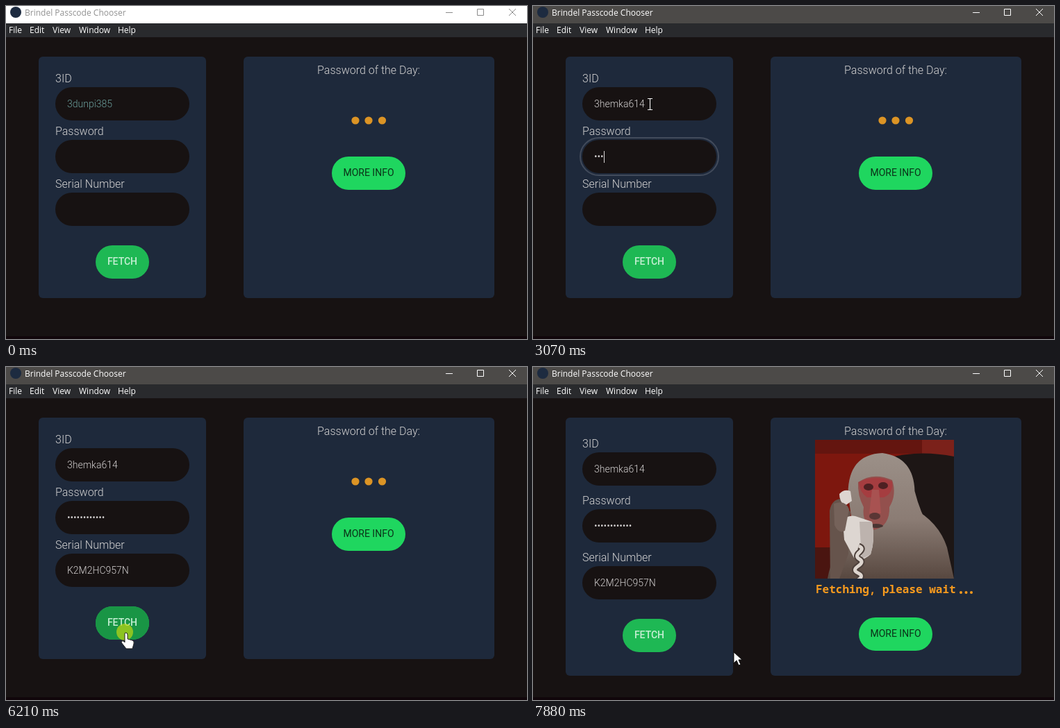
An HTML page with a canvas that plays this animation: 750x480 px, repeating every 8 s.

```html
<!DOCTYPE html>
<html lang="en">
<head>
<meta charset="utf-8">
<title>Password fetch</title>
<style>
  html, body { margin: 0; width: 100%; height: 100%; overflow: hidden; background: #171212; }
  canvas { display: block; }
</style>
</head>
<body>
<canvas id="stage" width="750" height="480"></canvas>
<script>
const ctx = document.getElementById('stage').getContext('2d');
const LOOP = 8000, FOCUS = 600, LOADING = 6350;
const UI = '12px "Open Sans", sans-serif';
const LABEL = '300 16px Roboto, sans-serif';
const INPUT = '300 14px Roboto, sans-serif';
const GREEN = '#1eb854', HOVER_GREEN = '#199545', PANEL = '#1e293b', DARK = '#171212';

const idKeys = [1000, 1210, 1410, 1500, 1580, 1670, 1810, 1900, 2000];
const passwordKeys = [2670, 2870, 3070, 3200, 3340, 3400, 3610, 3880, 3950, 4020, 4340, 4540];
// time, x, y
const mousePath = [
  [130, 215, 490], [560, 168, 141], [4740, 168, 141], [5140, 212, 352],
  [5500, 212, 352], [5950, 172, 384], [6280, 172, 384], [6500, 289, 411]
];

const ramp = (t, a, b) => {
  const k = Math.min(1, Math.max(0, (t - a) / (b - a)));
  return k * k * (3 - 2 * k);
};
const typed = (text, keys, t) => text.slice(0, keys.filter(k => k <= t).length);

function mouseAt(t) {
  let [, x, y] = mousePath[0];
  for (let i = 1; i < mousePath.length; i++) {
    const [a, x0, y0] = mousePath[i - 1], [b, x1, y1] = mousePath[i];
    const k = ramp(t, a, b);
    x += (x1 - x0) * k;
    y += (y1 - y0) * k;
  }
  return [x, y];
}

function rect(x, y, w, h, color, r = 0) {
  ctx.fillStyle = color;
  ctx.beginPath();
  ctx.roundRect(x, y, w, h, r);
  ctx.fill();
}
function disc(x, y, r, color, ry = r) {
  ctx.fillStyle = color;
  ctx.beginPath();
  ctx.ellipse(x, y, r, ry, 0, 0, 7);
  ctx.fill();
}
function text(str, x, y, font, color, align = 'left') {
  ctx.font = font;
  ctx.fillStyle = color;
  ctx.textAlign = align;
  ctx.fillText(str, x, y);
}
function shape(d, color, outline, width = 1) {
  const path = new Path2D(d);
  if (color) { ctx.fillStyle = color; ctx.fill(path); }
  if (outline) { ctx.strokeStyle = outline; ctx.lineWidth = width; ctx.stroke(path); }
}

function drawWindow(active) {
  rect(0, 0, 750, 480, DARK);
  rect(0, 476, 750, 4, '#10060a');
  rect(0, 0, 750, 25, active ? '#4c4a48' : '#fff');
  rect(0, 25, 750, 20, '#292a2d');
  disc(14, 9, 8, '#1d2b40');
  text('Brindel Passcode Chooser', 27, 14, UI, active ? '#fff' : '#919191');
  shape('M633 9.5h10M678.5 4.5h9v9h-9zM724 4l10 10M734 4l-10 10', null, active ? '#fff' : '#8a8a8a');
  [['File', 4], ['Edit', 34], ['View', 67], ['Window', 105], ['Help', 161]]
    .forEach(([name, x]) => text(name, x, 39, UI, '#fff'));
}

function drawField(label, value, y, { focused, caret, placeholder }) {
  text(label, 71, y - 7, LABEL, '#d3d2d2');
  rect(71, y, 193, 48, DARK, 24);
  if (focused) {
    ctx.strokeStyle = '#424b5b';
    ctx.lineWidth = 2;
    ctx.beginPath();
    ctx.roundRect(68, y - 3, 199, 54, 27);
    ctx.stroke();
  }
  text(value || placeholder || '', 88, y + 29, INPUT, value ? '#d3d0d0' : '#6a9e9b');
  if (focused && caret) rect(Math.round(88 + ctx.measureText(value).width), y + 16, 1, 17, '#d8d5d5');
}

function drawForm(t, loading) {
  const gap = loading ? 6 : 0;
  const focus = t < FOCUS ? -1 : t < 2140 ? 0 : t < 4740 ? 1 : t < 6140 ? 2 : -1;
  const caret = t < 5280 || t >= 5470;
  const fields = [
    ['3ID', typed('3hemka614', idKeys, t), '3dunpi385'],
    ['Password', typed('•'.repeat(12), passwordKeys, t)],
    ['Serial Number', t < 5470 ? '' : 'K2M2HC957N']
  ];
  rect(47, 73, 241, 348 + gap * 4, PANEL, 6);
  fields.forEach(([label, value, placeholder], i) =>
    drawField(label, value, 117 + 76 * i + gap * (i + 1), { focused: focus === i, caret, placeholder }));

  const y = 345 + gap * 3;
  rect(129, y, 77, 48, GREEN, 24);
  ctx.globalAlpha = ramp(t, 5700, 5900) - ramp(t, 6420, 6750);
  rect(129, y, 77, 48, HOVER_GREEN, 24);
  ctx.globalAlpha = 1;
  text('FETCH', 167.5, y + 28, '500 14px Roboto, sans-serif', '#c5efd3', 'center');
}

function drawMonkey(t) {
  const nod = 3.5 - 3.5 * Math.cos(Math.PI * (t - 6400) / 1500);
  const talk = Math.sin(t / 85);
  ctx.save();
  ctx.beginPath();
  ctx.rect(406, 105, 200, 200);
  ctx.clip();
  ctx.translate(406, 105);

  rect(0, 0, 200, 200, '#7d170e');
  rect(0, 0, 200, 20, '#64150f');
  rect(154, 0, 46, 32, '#7b211a');
  shape('M105 26Q150 14 200 24V200H105Z', '#1d1615');
  rect(0, 155, 40, 45, '#4a1510');

  const fur = ctx.createLinearGradient(0, 10, 0, 200);
  fur.addColorStop(0, '#9d928a');
  fur.addColorStop(0.55, '#8b7c74');
  fur.addColorStop(1, '#584840');
  shape('M18 200Q24 165 48 140L140 98Q178 118 190 155L200 200Z', fur);
  shape(`M${44 + nod / 2} ${70 + nod}Q48 ${14 + nod} 97 ${12 + nod}Q142 ${18 + nod} ${147 - nod / 2} 74
    Q151 104 166 130Q132 154 99 151Q70 154 54 125Z`, fur);

  ctx.save();
  ctx.translate(0, nod);
  shape('M62 54Q84 39 111 51Q118 72 107 90Q108 117 85 123Q67 113 70 90Q61 73 62 54Z', '#93504d');
  shape('M63 54Q86 42 111 53Q113 70 99 76H75Q64 68 63 54Z', '#a53d40');
  disc(77, 61, 7, '#4e2022', 5);
  disc(98, 59, 7, '#4e2022', 5);
  shape('M82 65H92L95 99H78Z', '#a85251');
  disc(86, 103, 8, '#5b3635', 5);
  disc(88, 117, 10, '#4a3533', 4 + talk);
  ctx.restore();

  ctx.translate(0, talk);
  shape('M22 210L21 103Q24 87 37 86L51 105L48 165L32 210Z', '#66544c');
  shape('M35 79Q42 71 51 75L53 89L43 96Q35 90 35 79Z', '#ddd5d0');
  shape('M40 117Q48 109 58 111L82 119Q87 145 80 166Q67 178 56 171L42 145Z', '#ddd6d1');
  shape('M64 119L82 119Q87 145 80 166L67 173Z', '#bdb3ae');
  shape('M27 93Q44 87 49 101L43 132Q34 137 28 124Z', '#75625a');
  shape('M63 154q8 3 1 9t0 10t-2 10t0 10t0 10', null, '#4d403b', 9);
  shape('M63 154q8 3 1 9t0 10t-2 10t0 10t0 10', null, '#ddd5cf', 5);
  ctx.restore();
}

function drawResult(t, loading) {
  rect(342, 73, 361, loading ? 372 : 348, PANEL, 6);
  text('Password of the Day:', 522, 98, LABEL, '#d3d2d2', 'center');
  if (loading) {
    drawMonkey(t);
    text('Fetching, please wait', 407, 326, 'bold 16px "Noto Sans Mono", monospace', '#f79a1e');
    [616, 623.5, 631].forEach(x => disc(x, 325, 2, '#f79a1e'));
  } else {
    [503, 522, 541.5].forEach(x => disc(x, 165, 5.6, '#dc9425'));
  }
  const y = loading ? 361 : 217;
  rect(469, y, 106, 48, '#1fd65f', 24);
  text('MORE INFO', 522, y + 28, '14px Roboto, sans-serif', '#0b3319', 'center');
}

function drawMouse(t) {
  const [x, y] = mouseAt(t);
  const inField = x > 71 && x < 264 && [117, 193, 269].some(top => y > top && y < top + 48);
  const onButton = x > 129 && x < 206 && y > 345 && y < 393;
  if ((t >= FOCUS && t < 740) || (t >= 6140 && t < 6280)) disc(x - 1, y - 2, 12, 'rgba(190,215,20,.7)');
  ctx.save();
  ctx.translate(Math.round(x), Math.round(y));
  if (inField) {
    shape('M-3 -7.5H4M-3 8.5H4M.5 -7.5V8.5', null, '#fff');
  } else if (onButton) {
    shape('M0-1q3 0 3 3v6l7 2q3 1 2 5l-2 7h-9l-7-9q0-3 3-2l2 2v-12q0-2 1-2z', '#fff', '#222');
  } else {
    shape('M0 0v16l4-4 3 7 3-1-3-7h5z', '#fff', '#111');
  }
  ctx.restore();
}

function render(now) {
  const t = now % LOOP, loading = t >= LOADING;
  drawWindow(t >= FOCUS);
  drawForm(t, loading);
  drawResult(t, loading);
  drawMouse(t);
}

const start = performance.now();
function tick() {
  render(performance.now() - start);
  requestAnimationFrame(tick);
}
tick();
</script>
</body>
</html>
```
